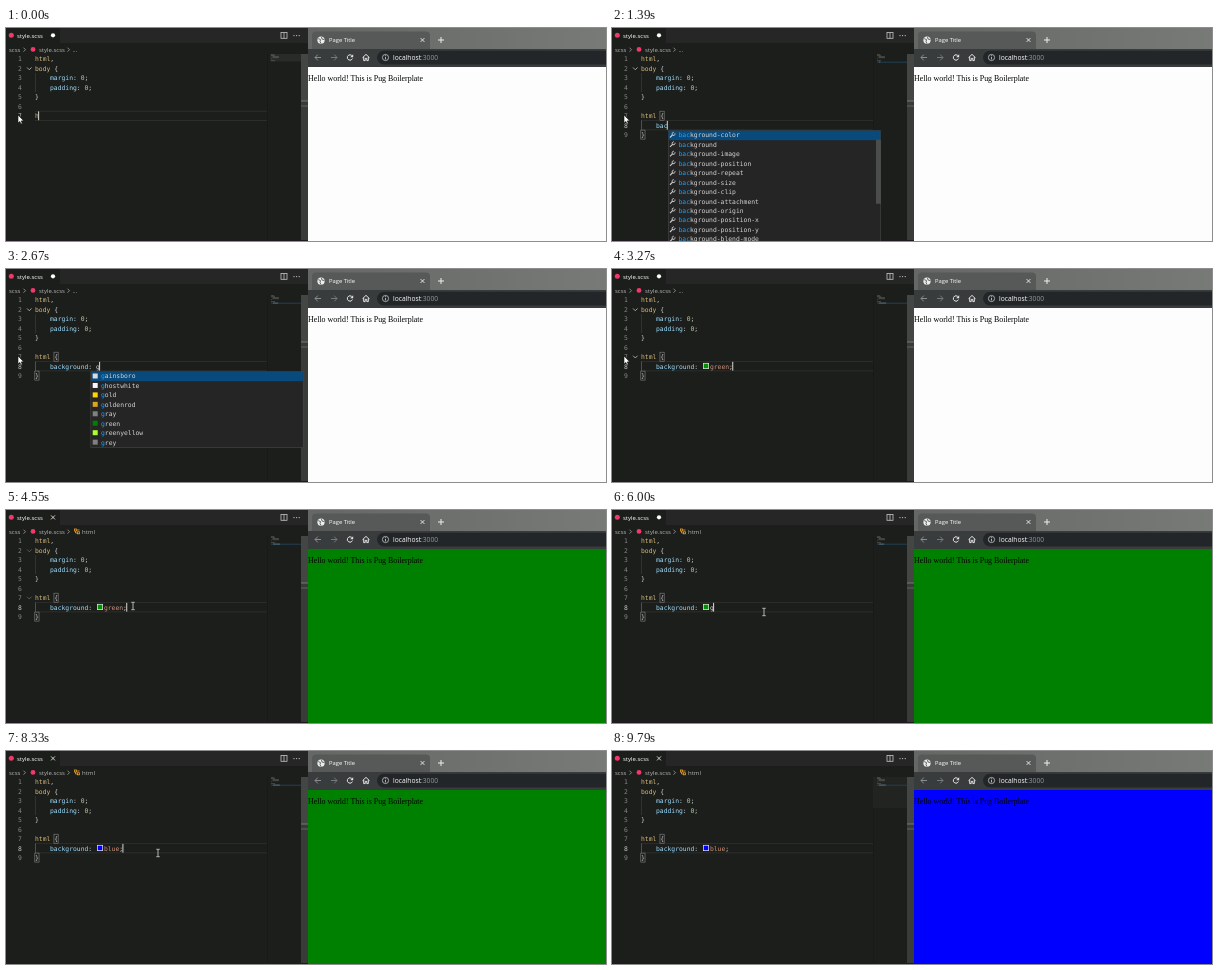
An HTML page with a canvas that plays this animation: 600 px wide and 213 px high, repeating every 9.88 s.

```html
<!DOCTYPE html>
<html lang="en">
<head>
<meta charset="utf-8">
<title>Live reload</title>
<style>
  html, body { margin: 0; width: 100%; height: 100%; overflow: hidden; background: #1c1e1b; }
  canvas { display: block; width: 600px; height: 213px; }
</style>
</head>
<body>
<canvas id="stage" width="600" height="213"></canvas>
<script>
const ctx = document.getElementById('stage').getContext('2d');
const LOOP = 9880;
const MONO = '6.36px "DejaVu Sans Mono", monospace';
const ui = size => `${size}px "Open Sans", sans-serif`;
const CHAR = 3.83, PITCH = 9.45, LEFT = 29, INDENT = 44;
const COLOR = {
  selector: '#d7ba7d', property: '#9cdcfe', number: '#b5cea8',
  value: '#ce9178', plain: '#d4d4d4', pink: '#f0386b'
};
const T = {
  enter: 840, accept: 2400, greenEnd: 3150, greenSwatch: 3220, greenSave: 3600,
  symbol: 3850, greenPage: 4250, edit: 5500, clear: 6130, blueStart: 6260, blueEnd: 7150,
  blueSwatch: 7240, blueSave: 7500, bluePage: 8600, mouseLeave: 9220, mouseGone: 9520
};
const PROPS = ['-color', '', '-image', '-position', '-repeat', '-size', '-clip', '-attachment',
  '-origin', '-position-x', '-position-y', '-blend-mode'].map(s => 'background' + s);
const NAMES = ['black', 'blanchedalmond', 'blue', 'blueviolet', 'gainsboro', 'ghostwhite',
  'gold', 'goldenrod', 'gray', 'green', 'greenyellow', 'grey'];

// Each key is [time, line number, resulting text].
const keys = [];
function type(at, step, line, base, added) {
  for (let i = 1; i <= added.length; i++) {
    keys.push([at + (i - 1) * step, line, base + added.slice(0, i)]);
  }
}
const RULE = 'background: ';
type(0, 120, 7, '', 'html {');
keys.push([T.enter, 8, '']);
type(1080, 110, 8, '', 'backgroun');
keys.push([2290, 8, 'background']);
type(T.accept, 90, 8, 'background', ': ');
type(2620, 106, 8, RULE, 'green;');
for (let n = 5; n >= 1; n--) keys.push([T.edit + (5 - n) * 110, 8, RULE + 'green'.slice(0, n)]);
keys.push([T.clear, 8, RULE]);
type(T.blueStart, 150, 8, RULE, 'blue');
keys.push([T.blueEnd, 8, RULE + 'blue;']);

function box(x, y, w, h, fill) {
  ctx.fillStyle = fill;
  ctx.fillRect(x, y, w, h);
}
function text(str, x, y, fill, font = MONO, align = 'left') {
  ctx.font = font;
  ctx.textAlign = align;
  ctx.fillStyle = fill;
  ctx.fillText(str, x, y);
}
function code(str, x, y, fill) {
  text(str, x, y, fill);
  return x + str.length * CHAR;
}
function stroke(color, width, ...paths) {
  ctx.strokeStyle = color;
  ctx.lineWidth = width;
  ctx.beginPath();
  for (const points of paths) {
    points.forEach(([x, y], i) => i ? ctx.lineTo(x, y) : ctx.moveTo(x, y));
  }
  ctx.stroke();
}
function disc(x, y, r, fill) {
  ctx.fillStyle = fill;
  ctx.beginPath();
  ctx.arc(x, y, r, 0, Math.PI * 2);
  ctx.fill();
}
function ring(x, y, r, color, width, from = 0, to = Math.PI * 2) {
  ctx.strokeStyle = color;
  ctx.lineWidth = width;
  ctx.beginPath();
  ctx.arc(x, y, r, from, to);
  ctx.stroke();
}
function cross(x, y, r, color) {
  stroke(color, 0.9, [[x - r, y - r], [x + r, y + r]], [[x + r, y - r], [x - r, y + r]]);
}
function chevron(x, y, color) {
  stroke(color, 0.7, [[x - 1, y - 2], [x + 1, y], [x - 1, y + 2]]);
}
const rowY = line => 31 + (line - 1) * PITCH;
const baseline = line => rowY(line) + 2.4;
const clamp = v => Math.max(0, Math.min(1, v));
const ease = v => { v = clamp(v); return v * v * (3 - 2 * v); };
const between = (t, a, b) => t >= a && t < b;

function stateAt(t) {
  const lines = { 7: '', 8: '' };
  let last = keys[0];
  for (const key of keys) {
    if (key[0] > t) break;
    lines[key[1]] = key[2];
    last = key;
  }
  const swatch = between(t, T.greenSwatch, T.clear + 20) ? '#009000'
    : t >= T.blueSwatch ? '#0000ff' : null;
  return {
    t, lines, swatch, active: last[1],
    split: t >= T.enter,
    cursorOn: Math.floor((t - last[0]) / 500) % 2 === 0,
    saved: between(t, T.greenSave, T.edit) || t >= T.blueSave,
    symbol: t >= T.symbol
  };
}

function drawHeader(s) {
  box(0, 0, 302, 15, '#252625');
  box(0, 0, 54, 15, '#1c1e1b');
  disc(5.3, 7.3, 2.5, COLOR.pink);
  text('style.scss', 11, 9.6, '#ffffff', ui(6));
  if (s.saved) cross(47, 7.4, 2, '#e0e0e0');
  else disc(47, 7.3, 2.1, '#ffffff');

  ctx.strokeStyle = '#c5c5c5';
  ctx.lineWidth = 0.8;
  ctx.strokeRect(275, 4.5, 6, 5.8);
  stroke('#c5c5c5', 0.8, [[278, 4.5], [278, 10.3]]);
  for (const x of [288, 290.6, 293.2]) disc(x, 7.6, 0.65, '#c5c5c5');

  const gray = '#b4b4b4';
  text('scss', 3, 23.6, gray, ui(6));
  chevron(18.5, 21.7, gray);
  disc(27, 21.4, 2.4, COLOR.pink);
  text('style.scss', 33, 23.6, gray, ui(6));
  chevron(62.5, 21.7, gray);
  if (s.symbol) {
    ctx.strokeStyle = '#ee9d28';
    ctx.lineWidth = 0.8;
    ctx.strokeRect(68.5, 19, 2, 2);
    ctx.strokeRect(71.5, 21.8, 2, 2);
    stroke('#ee9d28', 0.8, [[69.5, 21], [69.5, 23], [71.5, 23]], [[70.5, 20], [73.5, 20]]);
    text('html', 76, 23.6, gray, ui(6));
  } else {
    text('...', 66.5, 23.6, gray, ui(6));
  }
}

function drawBracket(ch, x, line) {
  ctx.strokeStyle = '#858585';
  ctx.lineWidth = 0.6;
  ctx.strokeRect(x - 0.2, rowY(line) - 4.5, CHAR + 0.4, 9);
  text(ch, x, baseline(line), COLOR.plain);
}

function declaration(name, line) {
  const x = code(name, INDENT, baseline(line), COLOR.property);
  const end = code(': ', x, baseline(line), COLOR.plain);
  code(';', code('0', end, baseline(line), COLOR.number), baseline(line), COLOR.plain);
}

// Draws the edited declaration and returns the caret position.
function drawRule(s) {
  const y = baseline(8);
  const [name, rest] = s.lines[8].split(':');
  let x = code(name, INDENT, y, COLOR.property);
  if (rest === undefined) return x;
  x = code(':', x, y, COLOR.plain);
  if (!rest) return x;
  x += CHAR;
  if (s.swatch) {
    box(91, rowY(8) - 3.2, 6, 6, '#e8e8e8');
    box(91.7, rowY(8) - 2.5, 4.6, 4.6, s.swatch);
    x += 8;
  }
  const value = rest.slice(1).replace(';', '');
  x = code(value, x, y, NAMES.includes(value) ? COLOR.value : COLOR.plain);
  return rest.endsWith(';') ? code(';', x, y, COLOR.plain) : x;
}

function drawPopup(s, caret) {
  const [name, rest] = s.lines[8].split(':');
  const value = rest ? rest.slice(1) : '';
  const open = s.t < T.greenEnd || between(s.t, T.blueStart, T.blueEnd);
  if (!open || (rest === undefined ? !name : !value)) return;
  const prefix = rest === undefined ? name : value;
  const items = rest === undefined ? PROPS : NAMES.filter(n => n.startsWith(prefix));
  const x = Math.min(caret + 0.5, 84.5), top = 102.3;
  const height = items.length * PITCH + 1;
  box(x, top, 213, height, '#454545');
  box(x + 0.6, top + 0.6, 211.8, height - 1.2, '#252526');
  box(x + 0.6, top + 0.4, 211.8, PITCH, '#094a7d');
  items.forEach((item, i) => {
    const y = top + i * PITCH + 4.8;
    if (rest === undefined) {
      stroke('#d0d0d0', 1.1, [[x + 2, y + 2.4], [x + 4.8, y - 0.4]]);
      ring(x + 5.6, y - 1.2, 1.5, '#d0d0d0', 0.9, -0.4, 5);
    } else {
      box(x + 2.2, y - 2.6, 5, 5, item);
    }
    const next = code(prefix, x + 10.5, y + 2.3, '#18a3ff');
    code(item.slice(prefix.length), next, y + 2.3, COLOR.plain);
  });
  if (items.length > 10) box(x + 208, top + PITCH, 5, 64, '#4b4c4c');
}

function drawFolds(s) {
  ctx.globalAlpha = 1 - clamp((s.t - 4350) / 350);
  const lines = s.t > 3100 ? [2, 7] : [2];
  for (const line of lines) {
    const y = rowY(line);
    stroke('#c5c5c5', 0.8, [[21, y - 1], [23.3, y + 1.3], [25.6, y - 1]]);
  }
  ctx.globalAlpha = 1;
}

function drawMinimap(s) {
  box(261, 26, 1, 187, '#191a18');
  if (!s.split) box(264, 26, 31, 7.5, '#292b29');
  if (s.t >= T.mouseGone) box(261, 26, 34, 31, '#222421');
  const widths = [4, 5, 8, 8, 1, 0, 5];
  widths.forEach((w, i) => box(265 + (w === 8 ? 1.5 : 0), 26.5 + i, w * 0.8, 0.6, '#66685f'));
  if (s.split) {
    box(265, 33.7, 30, 1, '#213f55');
    box(267, 33.7, s.lines[8].length * 0.4, 0.7, '#6c8591');
  }
  box(295, 26, 7, 187, '#393b39');
  box(295, 26, 7, 47, '#444644');
  box(295, 72.5, 7, 1, '#777977');
  box(295, 77.5, 7, 1, '#626462');
}

function drawEditor(s) {
  box(0, 0, 302, 213, '#1c1e1b');
  drawHeader(s);
  const y = rowY(s.active);
  box(LEFT, y - 4.9, 232, 0.8, '#30322f');
  box(LEFT, y + 4.3, 232, 0.8, '#30322f');

  const count = s.split ? 9 : 7;
  for (let n = 1; n <= count; n++) {
    text(n, 14, baseline(n), n === s.active ? '#c6c6c6' : '#858885', MONO, 'center');
  }
  box(LEFT, rowY(3) - 4.7, 0.6, PITCH * 2, '#404240');
  if (s.split) box(LEFT, rowY(8) - 4.7, 0.6, PITCH, '#707270');

  code(',', code('html', LEFT, baseline(1), COLOR.selector), baseline(1), COLOR.plain);
  code(' {', code('body', LEFT, baseline(2), COLOR.selector), baseline(2), COLOR.plain);
  declaration('margin', 3);
  declaration('padding', 4);
  code('}', LEFT, baseline(5), COLOR.plain);

  const opening = s.lines[7];
  let caret = code(opening.replace('{', ''), LEFT, baseline(7), COLOR.selector);
  if (opening.endsWith('{')) {
    drawBracket('{', caret, 7);
    caret += CHAR;
    if (s.split) drawBracket('}', LEFT, 9);
    else drawBracket('}', caret, 7);
  }
  if (s.split) caret = drawRule(s);
  if (s.cursorOn) box(caret - 0.7, y - 4.3, 1, 8.8, '#d8d8d4');

  drawFolds(s);
  drawMinimap(s);
  box(0, 212, 302, 1, '#21182400'.slice(0, 7));
  drawPopup(s, caret);
}

function drawBrowser(t) {
  const strip = ctx.createLinearGradient(302, 0, 600, 0);
  strip.addColorStop(0, '#646764');
  strip.addColorStop(1, '#777a77');
  box(302, 0, 298, 22, strip);
  box(302, 21, 298, 18, '#393c3c');
  ctx.fillStyle = '#565957';
  ctx.beginPath();
  ctx.roundRect(306, 3.5, 118, 17.5, [4, 4, 0, 0]);
  ctx.fill();

  disc(315, 12.2, 3.6, '#eceeee');
  stroke('#565957', 0.9, [[312.2, 10.6], [314.6, 11.6], [314, 13.6], [315, 15.4]],
    [[315.5, 9], [316, 11], [318.3, 11.6]]);
  text('Page Title', 323, 14.3, '#ffffff', ui(5.8));
  cross(416.5, 12, 1.9, '#f0f0f0');
  stroke('#eeeeee', 1, [[432, 12], [438, 12]], [[435, 9], [435, 15]]);

  const arrow = (x, dir, color) => stroke(color, 1, [[x - 3, 29.5], [x + 3, 29.5]],
    [[x + dir * 0.2, 26.6], [x + dir * 3, 29.5], [x + dir * 0.2, 32.4]]);
  arrow(312, -1, '#8b8e8e');
  arrow(328, 1, '#777a7a');
  ring(344, 29.5, 2.7, '#e4e4e4', 1, 0.4, 5.5);
  ctx.fillStyle = '#e4e4e4';
  ctx.beginPath();
  ctx.moveTo(347.2, 26.2);
  ctx.lineTo(347.2, 29.2);
  ctx.lineTo(344.2, 29.2);
  ctx.fill();
  stroke('#e4e4e4', 1, [[356.5, 29.7], [360, 26.4], [363.5, 29.7]],
    [[357.7, 29], [357.7, 32.6], [359.2, 32.6], [359.2, 30.4], [360.8, 30.4],
      [360.8, 32.6], [362.3, 32.6], [362.3, 29]]);

  ctx.fillStyle = '#232628';
  ctx.beginPath();
  ctx.roundRect(371, 22.7, 240, 13.8, 6.9);
  ctx.fill();
  ring(379.5, 29.5, 3.1, '#c3c6c6', 0.8);
  box(379.1, 29, 0.9, 2.4, '#c3c6c6');
  box(379.1, 27.3, 0.9, 0.9, '#c3c6c6');
  text('localhost', 387, 31.9, '#ffffff', ui(6.7));
  text(':3000', 415, 31.9, '#969a9d', ui(6.7));

  const page = t >= T.bluePage ? '#0000ff' : t >= T.greenPage ? '#008000' : '#fdfdfd';
  box(302, 39, 298, 174, page);
  text('Hello world! This is Pug Boilerplate', 302, 53.4, '#000000',
    '7.9px "Liberation Serif", serif');
}

function drawMouse(t) {
  if (t >= T.mouseGone) return;
  const first = ease((t - 4260) / 240), second = ease((t - 5080) / 350);
  const leave = ease((t - T.mouseLeave) / (T.mouseGone - T.mouseLeave));
  const x = 12 + 115 * first + 25 * second + 118 * leave;
  const y = 87 + 9 * first + 6 * second + 10 * leave;
  if (x < 29) {
    ctx.fillStyle = '#ffffff';
    ctx.strokeStyle = '#111111';
    ctx.lineWidth = 0.6;
    ctx.beginPath();
    [[0, 0], [0, 8], [1.8, 6.4], [3, 9], [4.3, 8.4], [3.2, 5.9], [5.6, 5.7]]
      .forEach(([dx, dy]) => ctx.lineTo(x + dx, y + dy));
    ctx.closePath();
    ctx.fill();
    ctx.stroke();
  } else {
    stroke('#d8d8d8', 0.8, [[x, y - 3.5], [x, y + 3.5]],
      [[x - 1.7, y - 3.7], [x + 1.7, y - 3.7]], [[x - 1.7, y + 3.7], [x + 1.7, y + 3.7]]);
  }
}

function frame() {
  const t = performance.now() % LOOP;
  drawEditor(stateAt(t));
  drawBrowser(t);
  drawMouse(t);
  requestAnimationFrame(frame);
}
frame();
</script>
</body>
</html>
```
